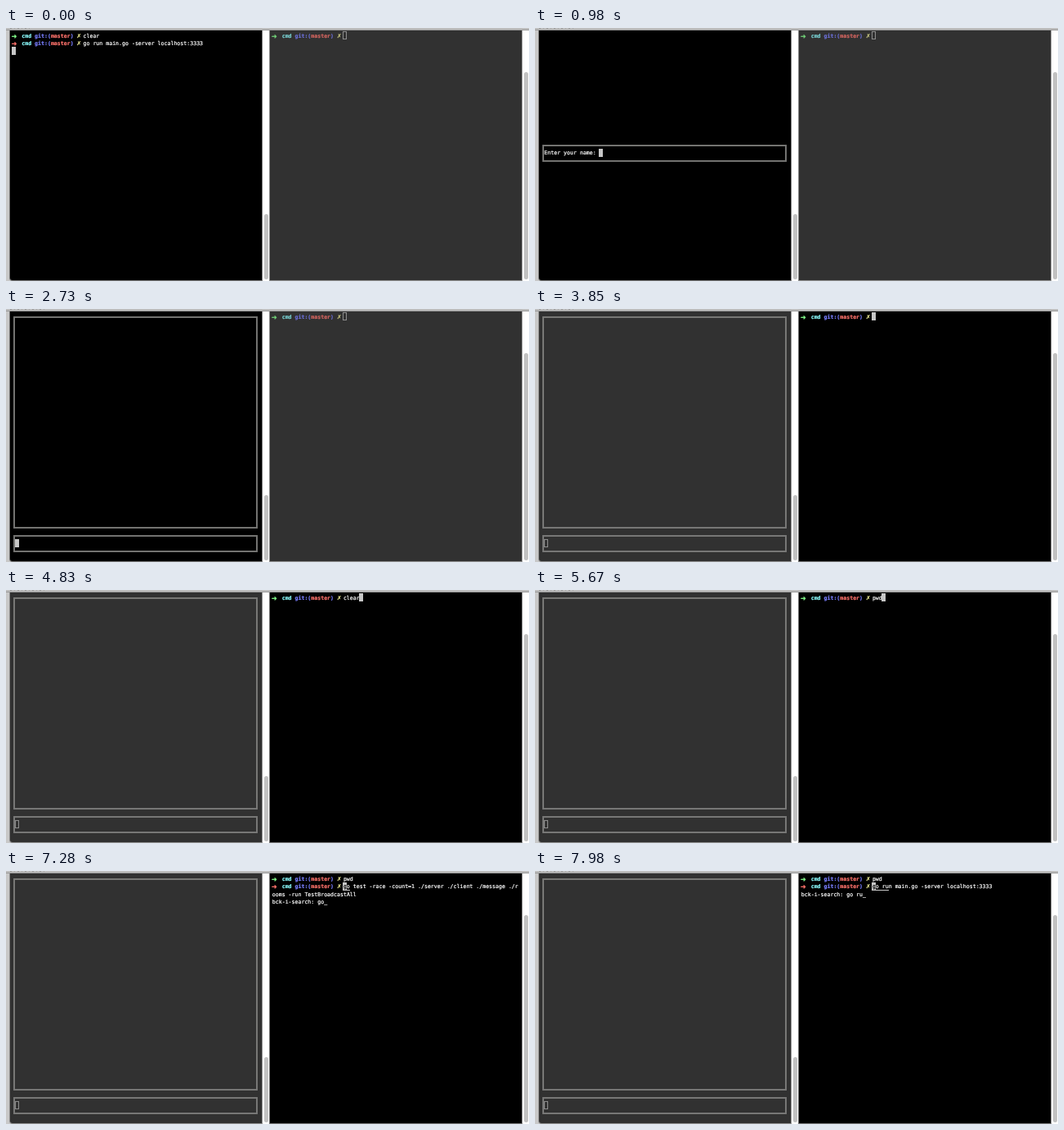
These frames come from a looping animation (640 by 310 pixels, 8 s). An HTML page:

```html
<!DOCTYPE html>
<html lang="en">
<head>
<meta charset="utf-8">
<title>Terminal chat</title>
<style>
  html, body { margin: 0; width: 100%; height: 100%; overflow: hidden; background: #c8c8c8; }
  #stage { position: relative; width: 640px; height: 310px; overflow: hidden; background: #c8c8c8; }
  #stage div, #stage span { position: absolute; box-sizing: border-box; }
  .bar { left: 0; top: 0; width: 640px; height: 3px; background: #bdbdbd; border-bottom: 1px solid #999; }
  .title { left: 5px; top: 0; height: 1px; background: repeating-linear-gradient(90deg, #999 0 2px, #bdbdbd 2px 5px, #a5a5a5 5px 6px, #bdbdbd 6px 9px); }
  .gutter { top: 3px; height: 307px; width: 10px; background: #fff; }
  .thumb { width: 5px; border-radius: 2.5px; background: #c1c1c1; }
  /* Translucent edges stand for panes that end on half pixels. */
  .pane {
    top: 3px; width: 310px; height: 307px; background: #000; overflow: hidden;
    border: solid rgba(235, 235, 235, .5); border-width: 0 1px 1px;
  }
  #left { left: 4px; border-bottom-left-radius: 4px; }
  #right { left: 322px; }
  .pane.off { background: #313131; }
  .grid { top: -3px; width: 640px; height: 310px; }
  .off .grid { opacity: .78; }
  #left .grid { left: -5px; }
  #right .grid { left: -323px; }
  .grid span {
    margin-top: 1px;
    font: 6.58px/9.57px "DejaVu Sans Mono", monospace;
    text-rendering: geometricPrecision;
    -webkit-text-stroke: .2px currentColor;
    white-space: pre; color: #fff;
  }
  .grid .b { font-weight: bold; }
  .grid .sym { font-family: "DejaVu Sans", sans-serif; font-weight: bold; }
  .grid .arrow { font-size: 8.4px; margin-left: -1px; }
  .grid .green { color: #84ff8c; }
  .grid .red { color: #ff736c; }
  .grid .cyan { color: #8cfdff; }
  .grid .blue { color: #7a7fff; }
  .grid .yellow { color: #fffda0; }
  .grid .dark { color: #000; }
  .cursor { width: 5px; height: 10px; background: #c7c7c7; }
  .off .cursor { background: none; border: 1px solid #a8a8a8; }
  .line { height: 1px; background: #ccc; }
  .box { left: 9px; width: 299px; border: 2px solid rgba(230, 230, 225, .5); }
</style>
</head>
<body>
<div id="stage">
  <div class="bar"></div>
  <div class="title" id="title"></div>
  <div class="gutter" style="left:313px"></div>
  <div class="gutter" style="left:631px"></div>
  <div class="thumb" style="left:316px;top:228px;height:80px"></div>
  <div class="thumb" style="left:634px;top:54px;height:254px"></div>
  <div class="pane" id="left"><div class="grid"></div></div>
  <div class="pane" id="right"><div class="grid"></div></div>
</div>
<script>
const LOOP = 8000, COL = 3.96, ROW = 9.57, TOP = 4.7, COLS = 76, CMD = 22;
const X = { left: 7.4, right: 325.8 };
const RUN = 'go run main.go -server localhost:3333';
const LONG = 'go test -race -count=1 ./server ./client ./message ./rooms -run TestBroadcastAll';
const NAME = 'guest';

// Drawing helpers for one terminal, returning markup.
function terminal(side) {
  const x = col => X[side] + col * COL;
  const y = row => TOP + row * ROW;
  const text = (col, row, s, cls = '') =>
    `<span class="${cls}" style="left:${x(col).toFixed(2)}px;top:${y(row).toFixed(2)}px">${s}</span>`;
  const cursor = (col, row) =>
    `<div class="cursor" style="left:${Math.floor(x(col))}px;top:${Math.floor(y(row))}px"></div>`;
  const underline = (col, row, n) =>
    `<div class="line" style="left:${x(col).toFixed(2)}px;top:${Math.floor(y(row) + ROW)}px;width:${n * COL}px"></div>`;
  const prompt = (row, color = 'green') =>
    text(0, row, '➜', 'sym arrow ' + color) + text(3, row, 'cmd', 'b cyan') +
    text(7, row, 'git:(', 'b blue') + text(12, row, 'master', 'b red') +
    text(18, row, ')', 'b blue') + text(20, row, '✗', 'sym yellow');
  const command = (row, s) => {
    const room = COLS - CMD;
    return text(CMD, row, s.slice(0, room)) + text(0, row + 1, s.slice(room));
  };
  return { text, cursor, underline, prompt, command };
}

const L = terminal('left'), R = terminal('right');
const box = (top, height) => `<div class="box" style="top:${top}px;height:${height}px"></div>`;

const ask = typed => box(143, 21) + L.text(1, 15, 'Enter your name: ' + typed) + L.cursor(18 + typed.length, 15);
const chat = box(9, 260) + box(277, 21) + L.cursor(1, 29);

const leftStates = [
  [0, L.prompt(0) + L.text(CMD, 0, 'clear') + L.prompt(1, 'red') + L.text(CMD, 1, RUN) + L.cursor(0, 2)],
  [70, ''],
  [140, ask('')],
  [1330, ask(NAME.slice(0, 2))],
  [1400, ask(NAME.slice(0, 3))],
  [1680, ask(NAME.slice(0, 4))],
  [2100, ask(NAME)],
  [2660, chat]
];

function typed(s) {
  const end = CMD + s.length;
  return R.prompt(0) + R.command(0, s) + R.cursor(end % COLS, Math.floor(end / COLS));
}

const stopped = R.prompt(0) + R.text(CMD, 0, 'pwd') + R.prompt(1, 'red');

function search(query, match = '') {
  const at = CMD + Math.max(0, match.indexOf(query));
  const row = CMD + match.length > COLS ? 3 : 2;
  return stopped + R.command(1, match) + R.underline(at, 1, query.length) + R.cursor(at, 1) +
    (query ? R.text(at, 1, query[0], 'dark') : '') +
    R.text(0, row, 'bck-i-search: ' + query + '_');
}

const rightStates = [
  [0, typed('')],
  [4830, typed('clear')],
  [5040, typed(LONG)],
  [5670, typed('pwd')],
  [6230, stopped + R.cursor(CMD, 1)],
  [6580, search('')],
  [6860, search('g', 'tig .')],
  [7140, search('go', LONG)],
  [7350, search('go ', LONG)],
  [7630, search('go r', RUN)],
  [7840, search('go ru', RUN)]
];

const titleStates = [[0, 24], [140, 40], [980, 45]];

const at = (states, t) => states.findLast(s => s[0] <= t)[1];

function player(id, states, focused) {
  const pane = document.getElementById(id), grid = pane.firstElementChild;
  let shown = null;
  return t => {
    const html = at(states, t);
    if (html !== shown) grid.innerHTML = shown = html;
    pane.classList.toggle('off', !focused(t));
  };
}

const SWITCH = 3850;
const playLeft = player('left', leftStates, t => t < SWITCH);
const playRight = player('right', rightStates, t => t >= SWITCH);
const title = document.getElementById('title');
const start = performance.now();

function frame() {
  const t = (performance.now() - start) % LOOP;
  playLeft(t);
  playRight(t);
  title.style.width = at(titleStates, t) + 'px';
  requestAnimationFrame(frame);
}
frame();
</script>
</body>
</html>
```
